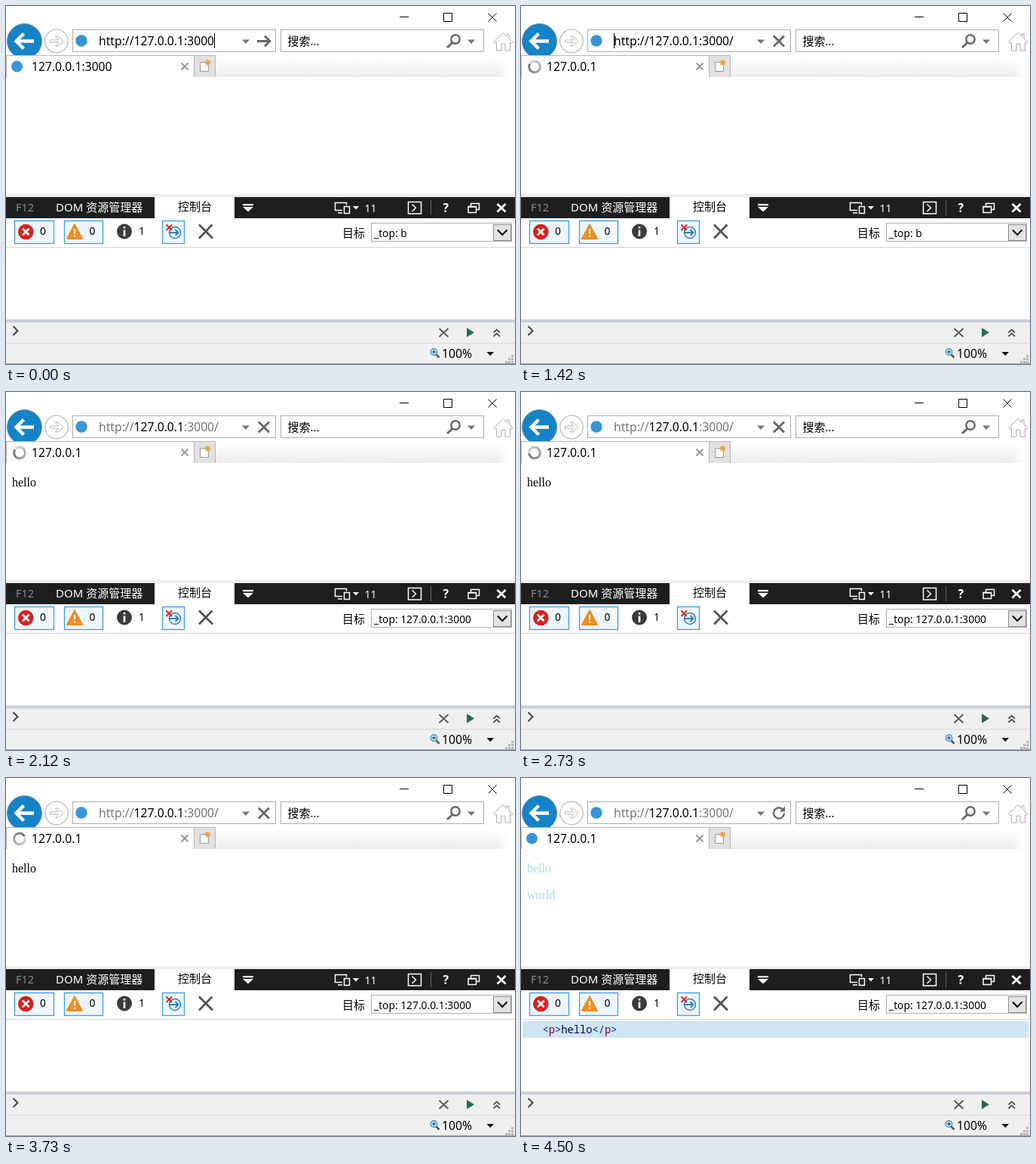
An HTML page for the animation above (6210 ms loop, 675 px wide and 474 px high).

```html
<!DOCTYPE html>
<html lang="zh">
<head>
<meta charset="utf-8">
<title>Chunked page load</title>
<style>
html, body { margin: 0; width: 100%; height: 100%; overflow: hidden; background: #fff; }
svg { display: block; width: 100%; height: 100%; }
text { font: 15px "Noto Sans", "Noto Sans CJK SC", "Noto Sans CJK JP", "Noto Sans CJK", sans-serif; white-space: pre; }
.url { font-size: 15.7px; }
.small { font-size: 13.8px; }
.page { font: 16px "Liberation Serif", serif; }
.code { font: 13.75px "Noto Sans Mono", monospace; }
.line { fill: none; stroke: #666; }
.box { fill: #fff; stroke: #adadad; }
.on { fill: #eef6fd; stroke: #3c9bf0; stroke-width: 1.3; }
.dim { fill: #757575; }
.white { fill: #fff; }
</style>
</head>
<body>
<svg viewBox="0 0 675 474">
  <defs>
    <linearGradient id="strip" x2="0" y2="1">
      <stop offset=".1" stop-color="#fff"/><stop offset="1" stop-color="#ececec"/>
    </linearGradient>
    <linearGradient id="fade">
      <stop stop-color="#fff" stop-opacity="0"/><stop offset="1" stop-color="#fff"/>
    </linearGradient>
  </defs>
  <rect width="675" height="474" fill="#fff"/>

  <!-- window buttons -->
  <path class="line" style="stroke:#000" d="M522 14.5h12M580.5 9.5h11v11h-11zM639.5 9.5l11 11M650.5 9.5l-11 11"/>

  <!-- navigation -->
  <circle cx="24.5" cy="46.5" r="23" fill="#1583c7" stroke="#6f8c9c"/>
  <path class="line" style="stroke:#fff" stroke-width="4.4" d="M37 46.5H14M23.5 36.5l-10 10 10 10"/>
  <circle class="line" style="stroke:#bdbdbd" cx="67" cy="46.5" r="15.3" stroke-width="1.3"/>
  <path class="line" style="stroke:#b5b5b5" d="M58.500 45h11l-4-5h3.500l7 6.500-7 6.500h-3.500l4-5h-11z"/>

  <rect class="box" x="88.500" y="31.500" width="269" height="29"/>
  <circle cx="100" cy="46" r="7.700" fill="#3794d8"/>
  <text id="url" class="url" x="123" y="52"><tspan id="scheme">http://</tspan>127.0.0.1<tspan id="port">:3000</tspan></text>
  <path id="caret" stroke="#000" d="M.5 36v20"/>
  <path class="dim" d="M313 44.500h10l-5 5.500z"/>
  <path id="go" class="line" stroke-width="2.800" d="M333 46.500h16M343 39.500l7 7-7 7"/>
  <path id="stop" class="line" stroke-width="2.800" d="M335 39.500l14 14M349 39.500l-14 14"/>
  <g id="reload">
    <path class="line" stroke-width="2.200" d="M347 41.500a7 7 0 1 0 2 5"/>
    <path fill="#666" d="M350 37.500v7h-7z"/>
  </g>

  <rect class="box" x="364.500" y="31.500" width="269" height="29"/>
  <text x="373.500" y="52">搜索...</text>
  <circle class="line" cx="596" cy="44" r="5.700" stroke-width="2.400"/>
  <path class="line" stroke-width="3" d="M592 48.500l-7 6.500"/>
  <path class="dim" d="M612 44.500h10l-5 5.500z"/>
  <path class="line" style="stroke:#aaa" d="M646.500 47.500l12.500-12 5 4.800v-3.300h3v6.300l5 4.200-2 2-1.500-1.300v11h-6.500v-9h-5v9h-6.500v-11l-2 1.300z"/>

  <!-- tabs -->
  <rect x="278" y="66" width="389" height="28" fill="url(#strip)"/>
  <rect x="652" y="66" width="15" height="28" fill="url(#fade)"/>
  <path class="box" d="M.5 94.500V65.500h249v29" style="stroke:#b5b5b5"/>
  <rect x="0" y="94" width="675" height="2" fill="#fff"/>
  <path d="M249.500 94V65.500h28V94" fill="#e1e1e1" stroke="#b5b5b5"/>
  <path d="M257.500 74.500h7l4 4v8h-11z" fill="#fff" stroke="#999"/>
  <path stroke="#e8a23a" stroke-width="1.500" d="M267.500 71v8M263.500 75h8M264.700 72.200l5.600 5.600M270.300 72.200l-5.600 5.600"/>
  <circle id="icon" cx="14.500" cy="80" r="7.500" fill="#3794d8"/>
  <g id="spin" fill="none" stroke-width="2.900"></g>
  <text id="tab" class="url" x="34" y="86"></text>
  <path class="line" style="stroke:#999" stroke-width="2" d="M232.500 75.500l9 9M241.500 75.500l-9 9"/>

  <!-- page -->
  <text id="hello" class="page" x="8" y="125">hello</text>
  <text id="world" class="page" x="8" y="160" fill="#add8e6">world</text>

  <!-- developer panel -->
  <rect y="249" width="675" height="4" fill="#eee"/>
  <rect y="253" width="675" height="28" fill="#1e1e1e"/>
  <rect x="197" y="253" width="106" height="28" fill="#fff"/>
  <text x="13" y="272" style="font-size:14.500px" fill="#8a8a8a">F12</text>
  <text class="white" x="66" y="272">DOM 资源管理器</text>
  <text x="228" y="271">控制台</text>
  <path class="white" d="M314 262h14v2.200h-14zM314 266h14l-7 6.500zM460 265h8l-4 4.500z"/>
  <path class="line" style="stroke:#fff" stroke-width="1.500" d="M446 270.500h-9.500v-10h15v3M440 274h6M448.500 265.500h7v9h-7z"/>
  <text class="white" x="475.500" y="273" style="font-size:14px">11</text>
  <path class="line" style="stroke:#fff" stroke-width="1.500" d="M533.500 259.500h17v15.500h-17zM538.500 262.500l5 4.700-5 4.800"/>
  <path stroke="#666" d="M563.500 257v20"/>
  <text class="white" x="579.500" y="273" style="font-weight:800;font-size:16px">?</text>
  <path class="line" style="stroke:#fff" stroke-width="1.500" d="M613 265.500h10.500v8H613zM616.500 265v-3.500h11v8H624M613 266h10M616 261.500h12"/>
  <path class="line" style="stroke:#fff" stroke-width="2.800" d="M651.500 262l11 10.500M662.500 262l-11 10.500"/>

  <rect class="on" x="11.500" y="284.500" width="52" height="30"/>
  <rect class="on" x="77.500" y="284.500" width="51" height="30"/>
  <rect class="on" x="207.500" y="284.500" width="29" height="30"/>
  <circle cx="26.300" cy="299" r="10.300" fill="#d8201f"/>
  <path stroke="#fff" stroke-width="2.800" d="M22 294.700l8.600 8.600M30.600 294.700l-8.600 8.600"/>
  <path d="M91 289.500l10 18.500H81z" fill="#ee8d24" stroke="#ee8d24" stroke-width="2" stroke-linejoin="round"/>
  <path stroke="#fff" stroke-width="2.200" d="M91 295v6.500M91 303.500v2.300"/>
  <circle cx="157" cy="298.500" r="10" fill="#3b3b3b"/>
  <path stroke="#fff" stroke-width="2.600" d="M157 292v2.600M157 296.500v8.500"/>
  <text x="45" y="303" class="small">0</text>
  <text x="110.500" y="303" class="small">0</text>
  <text x="176" y="303" class="small">1</text>
  <circle class="line" style="stroke:#2e7fb8" cx="224" cy="300" r="7.500" stroke-width="1.500"/>
  <path class="line" style="stroke:#2e7fb8" stroke-width="2" d="M216 300h12M224.500 296l4 4-4 4"/>
  <path stroke="#d8201f" stroke-width="1.900" d="M212.500 289.500l7.500 7.500M220 289.500l-7.500 7.500"/>
  <path class="line" style="stroke:#505050" stroke-width="2.600" d="M256 289.500l18 18M273.500 289.500l-17.500 18"/>
  <text x="446" y="306">目标</text>
  <rect class="box" x="484.500" y="287.500" width="186" height="24"/>
  <text id="target" class="small" x="488" y="305.500"></text>
  <rect x="646.500" y="289.500" width="23" height="21" fill="#e3e3e3" stroke="#8c8c8c"/>
  <path class="line" style="stroke:#111" stroke-width="2.200" d="M652 296.500l6.200 6.500 6.300-6.500"/>
  <rect y="319" width="675" height="1" fill="#d4d4d4"/>
  <g id="log">
    <rect x="2" y="321.500" width="671" height="22.500" fill="#d0e5f3"/>
    <text class="code" x="28.500" y="338" fill="#0026b8">&lt;<tspan fill="#800030">p</tspan>&gt;<tspan fill="#000070">hello</tspan>&lt;/<tspan fill="#800030">p</tspan>&gt;</text>
  </g>

  <!-- prompt and status bar -->
  <rect y="415" width="675" height="4" fill="#cbcfda"/>
  <rect y="419" width="675" height="55" fill="#efeff0"/>
  <rect y="446" width="675" height="1" fill="#d7d7d7"/>
  <rect y="473" width="675" height="1" fill="#a5a5a5"/>
  <path class="line" style="stroke:#444" stroke-width="2" d="M9.500 424l6 6-6 6"/>
  <path class="line" style="stroke:#555" stroke-width="1.800" d="M574.500 427l12 11M586.500 427l-12 11M646.500 432.500l4.200-4 4.300 4M646.500 437.500l4.200-4 4.300 4"/>
  <path fill="#2b6a4e" d="M611 426v12.500l10-6.300z"/>
  <path stroke="#555" stroke-width="2.500" d="M570.500 461.500l4 4"/>
  <circle cx="567.500" cy="458" r="4.200" fill="#d9effb" stroke="#4b8fbd" stroke-width="1.400"/>
  <path stroke="#1c5f9c" stroke-width="1.400" d="M565 458h5M567.500 455.500v5"/>
  <text class="url" x="578" y="466">100%</text>
  <path d="M637.500 458h9.500l-4.700 5z"/>
  <path fill="#b5b5b5" d="M670 462h3v3h-3zM666 466h3v3h-3zM670 466h3v3h-3zM662 470h3v3h-3zM666 470h3v3h-3zM670 470h3v3h-3z"/>
</svg>
<script>
const LOOP = 6210, LOAD = 1420, DONE = 4500, BLINK = 550, STEP = 77, ARCS = 24;
const $ = id => document.getElementById(id);
const show = (id, on) => $(id).style.display = on ? "" : "none";
const label = (id, text) => { if ($(id).textContent !== text) $(id).textContent = text; };

// Ring whose grey lightens around the turn
const point = k => {
  const a = k / ARCS * 2 * Math.PI;
  return `${7.3 * Math.sin(a)} ${-7.3 * Math.cos(a)}`;
};
for (let i = 0; i < ARCS; i++) {
  const grey = 215 - 105 * i / (ARCS - 1);
  $("spin").innerHTML +=
    `<path stroke="rgb(${grey},${grey},${grey})" d="M${point(i)}A7.3 7.3 0 0 1 ${point(i + 1.1)}"/>`;
}

function draw(t) {
  const loading = t >= LOAD && t < DONE;
  const started = t >= LOAD, done = t >= DONE;
  const step = Math.floor((t - LOAD) / STEP);
  const arrived = step >= 1;

  show("go", !started);
  show("stop", loading);
  show("reload", done);
  show("icon", !loading);
  show("spin", loading);
  show("hello", arrived);
  show("world", done);
  show("log", done);
  show("caret", started ? !arrived : t < BLINK || t >= 2 * BLINK);

  label("port", started ? ":3000/" : ":3000");
  label("tab", started ? "127.0.0.1" : "127.0.0.1:3000");
  label("target", arrived ? "_top: 127.0.0.1:3000" : "_top: b");
  for (const id of ["scheme", "port"]) $(id).setAttribute("fill", arrived ? "#757575" : "#000");
  $("hello").setAttribute("fill", done ? "#add8e6" : "#000");
  $("caret").setAttribute("transform", `translate(${started ? 123 : 276})`);
  $("spin").setAttribute("transform", `translate(18 80.5) rotate(${step * 40 - 60})`);
}

const start = performance.now();
function tick() {
  draw((performance.now() - start) % LOOP);
  requestAnimationFrame(tick);
}
tick();
</script>
</body>
</html>
```
